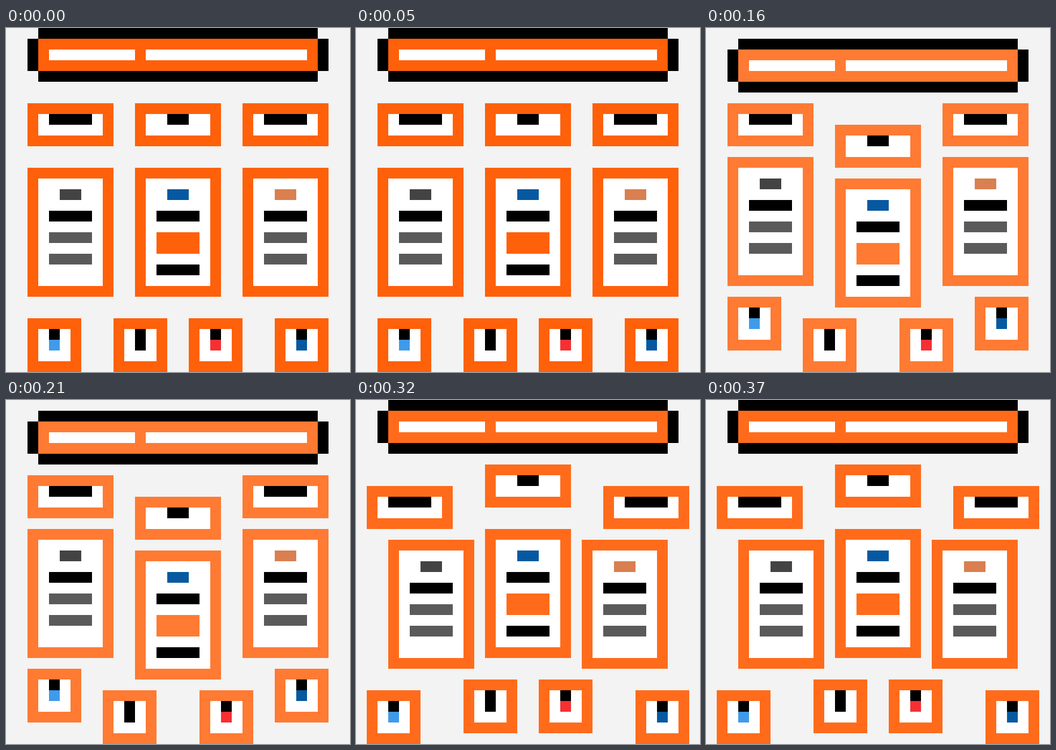
Recreate the animation shown at these times as an HTML page. Size 640 by 640 pixels, loop 0.4 s.

```html
<!DOCTYPE html>
<html lang="en">
<head>
<meta charset="utf-8">
<title>Bouncing blocks</title>
<style>
  html, body { margin: 0; width: 100%; height: 100%; overflow: hidden; background: #f3f3f3; }

  /* One user unit is one 20px block. */
  svg { display: block; width: 100%; height: 100%; fill: #000; shape-rendering: crispEdges; }
  svg, .move { animation: .4s step-end infinite; }
  svg { animation-name: glow; }
  .frame { fill: currentColor; }
  .paper { fill: #fff; }
  .grey { fill: #5a5a5a; }
  .accent { fill: var(--accent, #000); }

  .header { animation-name: header; }
  .tab { animation-name: tab; }
  .tab-mid { animation-name: tab-mid; }
  .card { animation-name: card; }
  .card-mid { animation-name: card-mid; }
  .key { animation-name: key; }
  .key-mid { animation-name: key-mid; }

  @keyframes glow {
    0% { color: #ff600a; }
    20%, 60%, 100% { color: #ff6b1a; }
    40% { color: #ff7a33; }
  }
  @keyframes header {
    0%, 60%, 100% { transform: translate(0, 0); }
    40% { transform: translate(0, 1px); }
  }
  @keyframes tab {
    0%, 40%, 60% { transform: translate(2px, 7px); }
    20% { transform: translate(2px, 6px); }
    80%, 100% { transform: translate(1px, 8px); }
  }
  @keyframes tab-mid {
    0%, 60% { transform: translate(12px, 7px); }
    20%, 80%, 100% { transform: translate(12px, 6px); }
    40% { transform: translate(12px, 9px); }
  }
  @keyframes card {
    0%, 60% { transform: translate(2px, 13px); }
    20% { transform: translate(2px, 11px); }
    40% { transform: translate(2px, 12px); }
    80%, 100% { transform: translate(3px, 13px); }
  }
  @keyframes card-mid {
    0%, 60% { transform: translate(12px, 13px); }
    20%, 80%, 100% { transform: translate(12px, 12px); }
    40% { transform: translate(12px, 14px); }
  }
  @keyframes key {
    0%, 60% { transform: translate(2px, 27px); }
    20% { transform: translate(2px, 26px); }
    40% { transform: translate(2px, 25px); }
    80%, 100% { transform: translate(1px, 27px); }
  }
  @keyframes key-mid {
    0%, 60% { transform: translate(10px, 27px); }
    20% { transform: translate(9px, 25px); }
    40% { transform: translate(9px, 27px); }
    80%, 100% { transform: translate(10px, 26px); }
  }
</style>
</head>
<body>
<svg viewBox="0 0 32 32">
  <defs>
    <g id="tab">
      <path class="frame" d="M0 0h8v4h-8z"/>
      <path class="paper" d="M1 1h6v2h-6z"/>
    </g>
    <g id="card">
      <path class="frame" d="M0 0h8v12h-8z"/>
      <path class="paper" d="M1 1h6v10h-6z"/>
      <path class="accent" d="M3 2h2v1h-2z"/>
      <path d="M2 4h4v1h-4z"/>
    </g>
    <path id="lines" class="grey" d="M2 6h4v1h-4zM2 8h4v1h-4z"/>
    <g id="key">
      <path class="frame" d="M0 0h5v5h-5z"/>
      <path class="paper" d="M1 1h3v3h-3z"/>
      <path d="M2 1h1v1h-1z"/>
      <path class="accent" d="M2 2h1v1h-1z"/>
    </g>
  </defs>

  <g class="move header">
    <path d="M3 0h26v1h1v3h-1v1h-26v-1h-1v-3h1z"/>
    <path class="frame" d="M3 1h26v3h-26z"/>
    <path class="paper" d="M4 2h8v1h-8zM13 2h15v1h-15z"/>
  </g>

  <!-- Left side -->
  <g class="move tab"><use href="#tab"/><path d="M2 1h4v1h-4z"/></g>
  <g class="move card" style="--accent: #434343"><use href="#card"/><use href="#lines"/></g>
  <g class="move key" style="--accent: #3f9bea"><use href="#key"/></g>
  <g class="move key-mid"><use href="#key"/></g>

  <!-- Centre -->
  <g class="move tab-mid"><use href="#tab"/><path d="M3 1h2v1h-2z"/></g>
  <g class="move card-mid" style="--accent: #0659a0">
    <use href="#card"/>
    <path class="frame" d="M2 6h4v2h-4z"/>
    <path d="M2 9h4v1h-4z"/>
  </g>

  <!-- Right side, mirrored -->
  <g transform="translate(32 0) scale(-1 1)">
    <g class="move tab"><use href="#tab"/><path d="M2 1h4v1h-4z"/></g>
    <g class="move card" style="--accent: #d97f50"><use href="#card"/><use href="#lines"/></g>
    <g class="move key" style="--accent: #0659a0"><use href="#key"/></g>
    <g class="move key-mid" style="--accent: #f53033"><use href="#key"/></g>
  </g>
</svg>
</body>
</html>
```
